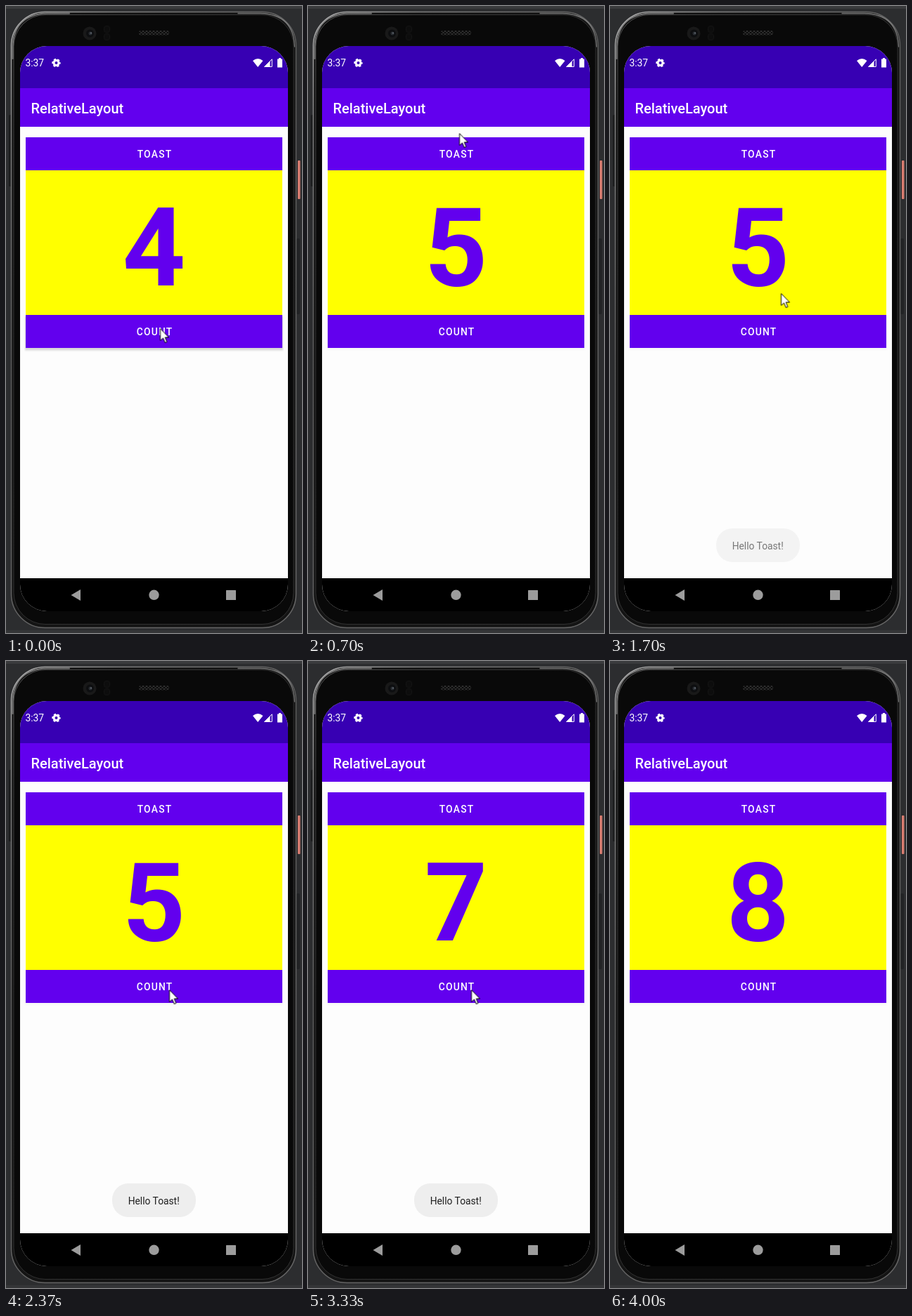
An HTML page that plays this animation: 421x893 px, repeating every 4650 ms.

```html
<!DOCTYPE html>
<html lang="en">
<head>
<meta charset="utf-8">
<title>Counter app</title>
<style>
  html, body { margin: 0; width: 100%; height: 100%; overflow: hidden; background: #2c2d2f; }
  svg { display: block; width: 100vw; height: 100vh; font-family: Roboto, sans-serif; }
  .label { font-size: 13.8px; font-weight: 500; letter-spacing: .0893em; text-anchor: middle; fill: #fff; }
  .digits { font-size: 156px; font-weight: 700; text-anchor: middle; fill: #6200ee; }

  .digits, .cursor, .toast, .press { animation: 4650ms step-end infinite; }
  .digits { animation-name: digits; }
  .cursor { animation-name: cursor; }
  .toast { animation-name: toast; }
  .toast-press { animation-name: toast-press; }
  .count-press { animation-name: count-press; }

  @keyframes digits {
    0% { transform: translateY(0); }
    9.03% { transform: translateY(-206px); }
    62.36% { transform: translateY(-412px); }
    71.61% { transform: translateY(-618px); }
    77.63%, 100% { transform: translateY(-824px); }
  }
  @keyframes cursor {
    0% { transform: translate(219.5px, 459.5px); }
    11.82% { transform: translate(216.5px, 283.5px); }
    15.05% { transform: translate(215.5px, 181.5px); }
    17.84% { transform: translate(215.5px, 188.5px); }
    20.64% { transform: translate(216.5px, 196.5px); }
    22.79% { transform: translate(216.5px, 202.5px); }
    25.59% { transform: translate(216.5px, 206.5px); }
    33.97% { transform: translate(228.5px, 300.5px); }
    36.55% { transform: translate(243.5px, 409.5px); }
    39.78% { transform: translate(241.5px, 454.5px); }
    42.36% { transform: translate(238.5px, 481.5px); }
    48.38% { transform: translate(235.5px, 474.5px); }
    50.96% { transform: translate(232.5px, 468.5px); }
    80.43% { transform: translate(296.5px, 630.5px); }
    83.22% { transform: translate(393.5px, 865.5px); opacity: 1; }
    86.02%, 100% { transform: translate(393.5px, 865.5px); opacity: 0; }
  }
  @keyframes toast {
    0% { opacity: 0; }
    36.55% { opacity: .6; }
    39.78% { opacity: .95; }
    42.36% { opacity: 1; }
    77.63% { opacity: .8; }
    80.43% { opacity: .3; }
    83.22%, 100% { opacity: 0; }
  }
  @keyframes toast-press {
    0% { opacity: .15; }
    28.17% { opacity: .5; }
    31.39% { opacity: 1; }
    33.97%, 100% { opacity: .15; }
  }
  @keyframes count-press {
    0% { opacity: 1; }
    3.01% { opacity: .15; }
    5.8% { opacity: 1; }
    9.03% { opacity: .15; }
    59.56% { opacity: .5; }
    62.36% { opacity: .7; }
    65.59% { opacity: .15; }
    68.38% { opacity: 1; }
    71.61% { opacity: .15; }
    74.4% { opacity: .3; }
    77.63%, 100% { opacity: .15; }
  }
</style>
</head>
<body>
<svg viewBox="0 0 421 893" preserveAspectRatio="none">
  <defs>
    <linearGradient id="rim" x2=".5" y2="1">
      <stop offset="0" stop-color="#b4b4b4"/>
      <stop offset=".15" stop-color="#808080"/>
      <stop offset=".45" stop-color="#5c5c5c"/>
      <stop offset="1" stop-color="#666"/>
    </linearGradient>
    <pattern id="mesh" width="5" height="4" patternUnits="userSpaceOnUse">
      <path d="M0 0L5 4M5 0L0 4" stroke="#333"/>
    </pattern>
    <filter id="soft" x="-5%" y="-30%" width="110%" height="160%">
      <feGaussianBlur stdDeviation="1"/>
    </filter>
    <clipPath id="screen"><rect x="20" y="57" width="381" height="805" rx="38"/></clipPath>
    <clipPath id="panel"><rect x="28" y="234" width="365" height="206"/></clipPath>
  </defs>

  <!-- Device body -->
  <rect width="421" height="893" fill="#2c2d2f"/>
  <rect width="421" height="4" fill="#3a3b3d"/>
  <rect y="889" width="421" height="4" fill="#343537"/>
  <rect x="4" y="155" width="4" height="102" rx="1.5" fill="#1c1d1e"/>
  <rect x="413" y="331" width="5" height="108" rx="2" fill="#222325"/>
  <rect x="415" y="220" width="3.500" height="55" rx="1" fill="#d87c70"/>
  <rect x="7.500" y="8.500" width="405" height="877" rx="48" fill="#141414" stroke="url(#rim)" stroke-width="1.500"/>
  <rect x="11" y="12.500" width="398" height="868" rx="45" fill="#090909" stroke="url(#rim)" stroke-opacity=".4"/>
  <g fill="none" stroke="#a0a0a0" stroke-width="2" stroke-linecap="round" stroke-opacity=".7">
    <path d="M9.500 75V58Q11 12 58 10.500H90"/>
    <path d="M330 10.500H362Q409 12 410.500 58" stroke-width="1.300"/>
  </g>

  <!-- Camera, sensors, speaker -->
  <circle cx="119" cy="39" r="9.500" fill="#191919"/>
  <circle cx="119.500" cy="39" r="5.500" fill="#0d0e10"/>
  <circle cx="120" cy="39" r="2.500" fill="#2b2f34"/>
  <circle cx="121" cy="38.500" r="1.100" fill="#656c74"/>
  <g fill="#0d0d0d" stroke="#151515">
    <rect x="139.500" y="28.500" width="8" height="9" rx="3"/>
    <rect x="139.500" y="39.500" width="8" height="9" rx="3"/>
  </g>
  <rect x="189" y="35" width="43" height="6.500" rx="3" fill="url(#mesh)"/>

  <g clip-path="url(#screen)">
    <rect x="20" y="57" width="381" height="805" fill="#fdfdfd"/>
    <rect x="20" y="57" width="381" height="60" fill="#3700b3"/>
    <rect x="20" y="117" width="381" height="55" fill="#6200ee"/>
    <rect x="20" y="815" width="381" height="47"/>

    <!-- Status bar -->
    <g fill="#fff">
      <text x="27.500" y="86" font-size="13.800">3:37</text>
      <g fill="none" stroke="#fff">
        <circle cx="71.500" cy="81" r="3.500" stroke-width="3"/>
        <circle cx="71.500" cy="81" r="5" stroke-width="2.400" stroke-dasharray="3 2.236" stroke-dashoffset="1.500"/>
      </g>
      <path d="M351 78Q358.200 72 365.500 78L358.200 87Z"/>
      <path d="M378.300 75.800V86.400H367.700Z" fill="none" stroke="#fff"/>
      <path d="M375.500 78.500V87H367Z"/>
      <path d="M388 75.500V74H391V75.500H393V87.500H386V75.500Z"/>
    </g>
    <text x="35.500" y="152.500" font-size="20" font-weight="500" fill="#fff">RelativeLayout</text>

    <!-- Buttons and counter -->
    <g filter="url(#soft)" fill-opacity=".15">
      <rect class="press toast-press" x="27" y="188" width="367" height="48"/>
      <rect class="press count-press" x="27" y="442" width="367" height="48.500"/>
    </g>
    <rect x="28" y="187" width="365" height="47" fill="#6200ee"/>
    <rect x="28" y="234" width="365" height="206" fill="#ff0"/>
    <rect x="28" y="440" width="365" height="47" fill="#6200ee"/>
    <text class="label" x="211.500" y="216">TOAST</text>
    <text class="label" x="211.500" y="469">COUNT</text>
    <g clip-path="url(#panel)">
      <g class="digits">
        <text x="210.500" y="398">4</text>
        <text x="210.500" y="604">5</text>
        <text x="210.500" y="810">6</text>
        <text x="210.500" y="1016">7</text>
        <text x="210.500" y="1222">8</text>
      </g>
    </g>

    <g class="toast">
      <rect x="151" y="744" width="119" height="48" rx="23" fill="#eee"/>
      <text x="210.200" y="774" font-size="13.800" text-anchor="middle" fill="#1f1f1f">Hello Toast!</text>
    </g>

    <!-- Navigation bar -->
    <g fill="#9c9c9c">
      <path d="M92.500 839L106 831V847Z"/>
      <circle cx="210.500" cy="838.800" r="7.200"/>
      <rect x="313" y="832" width="14" height="14" rx=".6"/>
    </g>
  </g>

  <path class="cursor" d="M0 0V17L4 13.500L6.800 20L9.400 19L6.800 12.500H12Z" fill="#fff" stroke="#000"/>
</svg>
</body>
</html>
```
